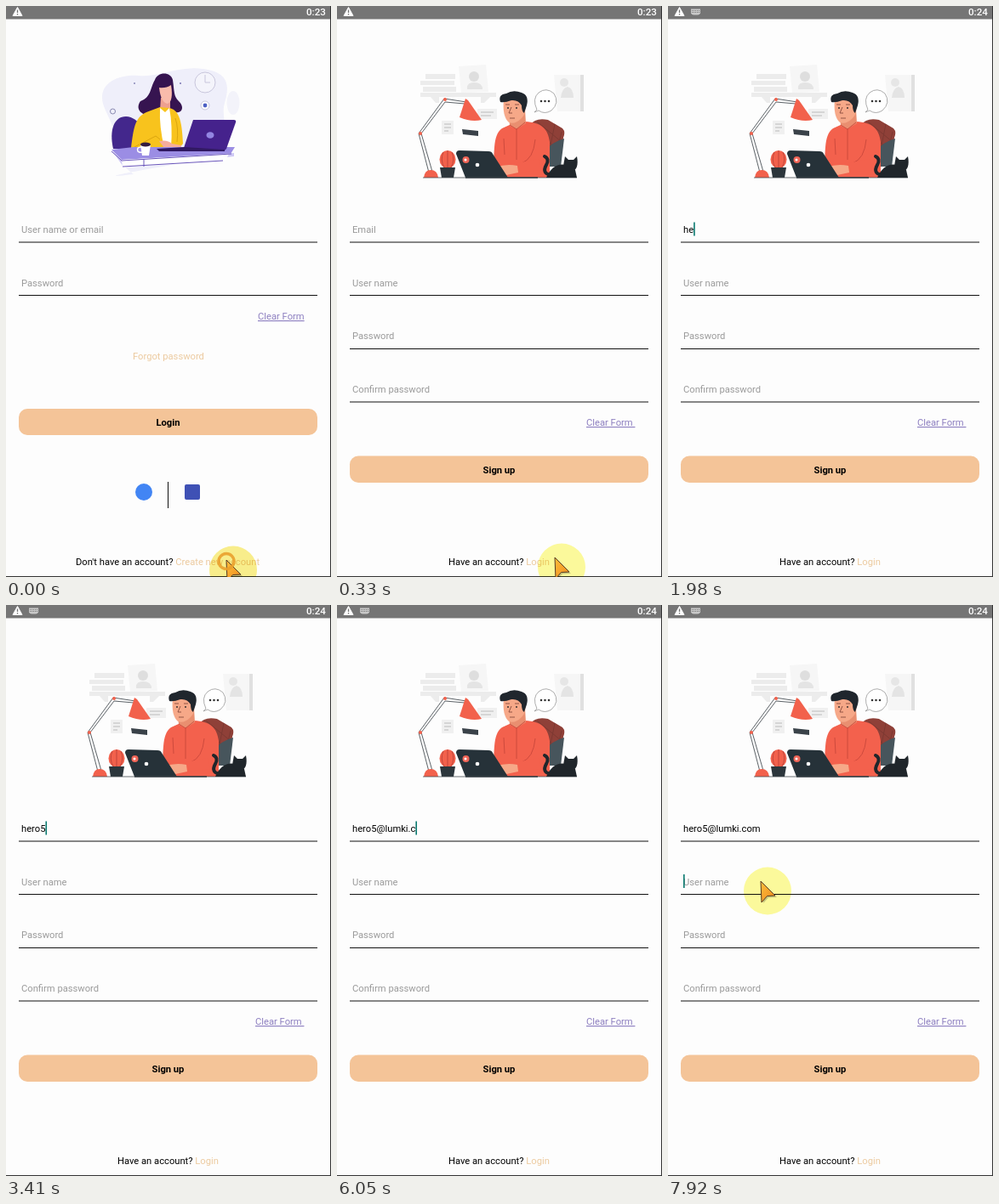
Recreate the animation shown at these times as an HTML page. Size 382 by 672 pixels, loop 8000 ms.

```html
<!DOCTYPE html>
<html lang="en">
<head>
<meta charset="utf-8">
<title>Sign up form</title>
<style>
  html, body { margin: 0; width: 100%; height: 100%; overflow: hidden; background: #fdfdfd; }
  svg { display: block; width: 382px; height: 672px; }
  text { font: 11.2px Roboto, sans-serif; white-space: pre; }
  .hint { fill: #9a9a9a; }
  .link { fill: #8d7fc0; text-decoration: underline; }
  .soft { fill: #ecca9f; }
  .bold { font-weight: 700; text-anchor: middle; }
  .rule { stroke: #111; stroke-width: 1.2; }
  .button { fill: #f4c498; }
  #halo { fill: #fdfb9c; mix-blend-mode: multiply; }
</style>
</head>
<body>
<svg viewBox="0 0 382 672">
  <defs>
    <linearGradient id="gold" x2="1" y2="1">
      <stop stop-color="#ffbd3c"/><stop offset="1" stop-color="#ee8a1c"/>
    </linearGradient>
  </defs>
  <rect width="382" height="672" fill="#fdfdfd"/>

  <g id="login">
    <!-- woman at a desk -->
    <path d="M114 115C108 92 130 80 156 82S202 70 232 74S263 94 257 114S269 157 245 178T172 191 150 198S126 182 127 160S119 131 114 115Z" fill="#efeffa"/>
    <ellipse cx="267" cy="114" rx="7.5" ry="14" fill="#f3f3fa"/>
    <g fill="none" stroke="#c3c1d8" stroke-width=".9">
      <circle cx="234" cy="90" r="12" fill="#f4f4fb"/><path d="M234 81V90H240"/>
      <circle cx="234" cy="117" r="5" fill="#fff"/>
      <circle cx="125.500" cy="124" r="3" stroke="#7c7ca8"/>
    </g>
    <circle cx="234" cy="117" r="2.400" fill="#4d60c4"/>
    <circle cx="151" cy="91" r="1" fill="#8a8ab8"/><circle cx="205" cy="91" r="1" fill="#7773b0"/>
    <path d="M126 168C121 146 127 130 141 130C157 131 164 148 170 168Z" fill="#43278c"/>
    <path d="M175 87C178 77 194 77 196 87C198 101 197 106 203 112C211 120 206 127 198 125L176 128C160 131 151 122 158 112C171 107 169 97 175 87Z" fill="#361450"/>
    <path d="M182 108H193V122L188 128L181 122Z" fill="#eda090"/>
    <path d="M180 96Q188 97 194 93Q197 112 190 115Q182 114 180 96Z" fill="#f9bbab"/>
    <path d="M147 167C150 145 151 131 165 125L181 119L192 120C202 122 207 132 208 162L204 167Z" fill="#f8c31d"/>
    <path d="M181 120L187 125L192 120Q196 141 194 166H186Q180 143 181 120Z" fill="#fff"/>
    <path d="M151 166L176 153L181 157M199 132Q203 144 201 160" fill="none" stroke="#dba50e"/>
    <path d="M180 159Q190 157 195 162L206 164V167H186Z" fill="#f6ad9c"/>
    <path d="M124 169L150 166H269L264 174L136 181Z" fill="#9b8de4"/>
    <path d="M124 169L136 181L268 173V177L137 188Z" fill="#cfc9f5"/>
    <path d="M136 181L262 174L258 182L137 190Z" fill="#fff"/>
    <path d="M124 171L136 182L265 174M137 189L255 182M162 180V189" fill="none" stroke="#6a56bb"/>
    <path d="M220 134H268Q271 134 270 137L259 168L257 170H208Z" fill="#45228c"/>
    <path d="M177 168L210 166L257 169V171H180Z" fill="#301861"/>
    <ellipse cx="240" cy="152" rx="4.500" ry="3.800" fill="#9386e2"/>
    <path d="M158 163H170L168 176H160Z" fill="#fff"/>
    <path d="M159 166Q153 166 155 171Q157 173 160 172" fill="none" stroke="#fff" stroke-width="1.500"/>
    <ellipse cx="164" cy="163" rx="6" ry="2.500" fill="#341c3f"/>

    <text class="link" x="296" y="369">Clear Form</text>
    <text class="soft" x="149" y="416">Forgot password</text>
    <rect class="button" x="15" y="474" width="351" height="31" rx="10"/>
    <text class="bold" x="190.500" y="494">Login</text>
    <circle cx="162" cy="572" r="10" fill="#4285f4"/>
    <path d="M190.500 560V591" stroke="#111"/>
    <rect x="210" y="563" width="18" height="18" rx="2" fill="#3f51b5"/>
    <text x="82" y="658">Don't have an account? <tspan class="soft">Create new account</tspan></text>
  </g>

  <g id="signup">
    <!-- man at a laptop -->
    <g fill="#ececec">
      <path d="M98 102H187V107H98ZM104 80H139V86H104ZM98 88H138V93H98ZM101 95H140V101H101Z"/>
      <path d="M110 107L116 114H120V107ZM169 107V114H173L180 107Z"/>
      <path d="M286 81H290V124H286Z" fill="#e0e0e0"/>
    </g>
    <path d="M143 71L175 69L178 101L146 102ZM255 81H286V124H259Z" fill="#f6f6f6"/>
    <path d="M153 98Q152 90 161 90Q171 90 171 98ZM263 108Q264 97 271 95Q278 97 278 108Z" fill="#e4e4e4"/>
    <circle cx="161" cy="83" r="6" fill="#dedede"/><circle cx="267" cy="90" r="5" fill="#e6e6e6"/>
    <path d="M123 135H137V151H123ZM165 121H188V133H165Z" fill="#f0f0f0"/>
    <path d="M126 139H134M126 143H134M126 147H131M169 125H184M169 129H181" stroke="#bbb"/>
    <path d="M147 145L166 147V153L148 151Z" fill="#3a4249"/>
    <path d="M108 196L96 150L126 109L152 113M112 195L99 150L127 113L150 115" fill="none" stroke="#4a5156" stroke-width=".9"/>
    <path d="M151 109L154 111L170 134Q158 137 144 131Z" fill="#f2614c"/>
    <g fill="#f2614c">
      <circle cx="98" cy="150" r="2"/><circle cx="127" cy="110" r="2"/>
      <path d="M102 202Q103 193 110 193Q118 193 119 202Z"/>
      <ellipse cx="130" cy="180.500" rx="9.500" ry="10.500"/>
    </g>
    <path d="M130 170V190M125 172Q121 181 126 190M135 172Q139 181 134 190" fill="none" stroke="#c2453a"/>
    <path d="M121 190H139L137 202H123Z" fill="#2c363c"/>

    <path d="M227 140Q233 131 248 134L265 144Q269 148 266 155L263 182L245 190Z" fill="#8f4038"/>
    <path d="M235 136L264 160M229 141L262 172M256 139L249 174M264 148L256 181" stroke="#7c3831" fill="none"/>
    <path d="M246 170Q252 160 267 156L263 189H247Z" fill="#47555c"/>
    <path d="M183 194C186 176 182 152 194 144L205 139L221 136C240 137 248 144 250 160V202H185Z" fill="#f3614d"/>
    <path d="M202 128L221 122L222 138L211 145L203 141Z" fill="#e98f70"/>
    <path d="M196 110Q208 106 221 114Q223 126 217 132Q209 140 202 137Q194 130 196 110Z" fill="#f6a888"/>
    <path d="M192 113Q189 104 199 103Q207 98 217 102Q226 105 223 117L220 126Q217 124 217 117Q213 110 205 111Q197 114 192 113Z" fill="#20262d"/>
    <path d="M198 116H203M209 116H214M205 119L202 126H206M203 132H209" fill="none" stroke="#8a4a3d" stroke-width=".9"/>
    <circle cx="201" cy="120" r="1" fill="#39302f"/><circle cx="211" cy="120" r="1" fill="#39302f"/>
    <path d="M203 140L211 145L221 137M211 145V181M233 157Q231 180 217 185M196 156L197 175" fill="none" stroke="#c9483b" stroke-width=".9"/>
    <path d="M211 185L237 180L240 193L213 196Z" fill="#f3614d"/>
    <path d="M186 190Q199 185 212 188L213 196L199 199L187 195Z" fill="#f6a888"/>
    <path d="M140 174Q140 170 144 170L178 171Q182 171 183 174L201 202H151Z" fill="#263239"/>
    <circle cx="151.500" cy="181" r="4" fill="#ef6557"/><circle cx="151" cy="181" r="1.500" fill="#fff"/>
    <circle cx="165" cy="187" r="2.300" fill="#fff"/>
    <path d="M151 202H236" stroke="#263239" stroke-width="1.500"/>
    <path d="M101 202H282" stroke="#454d52" stroke-width=".8"/>
    <g fill="#20262b">
      <path d="M246 202Q254 184 269 187L280 193L282 202Z"/>
      <path d="M266 188L268 177L272 181H278L282 177Q285 193 275 195Q268 194 266 188Z"/>
      <path d="M253 199Q240 198 246 187Q250 180 244 177" fill="none" stroke="#20262b" stroke-width="4" stroke-linecap="round"/>
    </g>
    <path d="M235 122Q229 109 237 102Q246 95 255 103Q262 114 252 123Q244 128 237 123L232 125Z" fill="#fff" stroke="#999" stroke-width=".8"/>
    <g fill="#333"><circle cx="240" cy="112" r="1.300"/><circle cx="244.500" cy="112" r="1.300"/><circle cx="249" cy="112" r="1.300"/></g>

    <text class="hint" x="18" y="392">Password</text>
    <text class="hint" x="18" y="455">Confirm password</text>
    <path class="rule" d="M15 403.500H366M15 466H366"/>
    <text class="link" x="293" y="494">Clear Form </text>
    <rect class="button" x="15" y="529.500" width="351" height="31.500" rx="10"/>
    <text class="bold" x="190.500" y="550">Sign up</text>
    <text x="131" y="658">Have an account? <tspan class="soft">Login</tspan></text>
  </g>

  <text id="first" x="18" y="267"></text>
  <text id="second" class="hint" x="18" y="330"></text>
  <path class="rule" d="M15 278H366M15 340.500H366"/>
  <rect id="caret" width="1.600" height="16" fill="#0b7a70"/>

  <rect width="382" height="15.500" fill="#757575"/>
  <path d="M13.500 1.500L19 11.500H8Z" fill="#fff" stroke="#fff" stroke-linejoin="round"/>
  <path d="M13.500 4.500V8M13.500 9V10.500" stroke="#757575" stroke-width="1.300"/>
  <g id="keyboard" fill="none">
    <path d="M27 3.500H38V8.500Q37 10.500 35 10.500H30Q28 10.500 27 8.500Z" fill="#c9c9c9"/>
    <path d="M28 5.500H37M28 7.500H37" stroke="#757575" stroke-dasharray="1 1"/>
  </g>
  <text id="clock" x="353" y="11" fill="#fff" style="font-size:11.6px;font-weight:500"></text>
  <path d="M381.500 0V672M0 671.500H382" stroke="#333"/>

  <circle id="halo" r="28"/>
  <g id="pointer">
    <path d="M2 2L19 19L9 19.500L3 26Z" fill="#0003"/>
    <path d="M0 0L17 17L7.500 17.500L1 25Z" fill="url(#gold)" stroke="#573c25" stroke-linejoin="round"/>
    <circle id="ring" cx="0" cy="1.500" r="9" fill="none" stroke="#e9a02c" stroke-width="3.500" opacity=".9"/>
  </g>
</svg>
<script>
const LOOP = 8000, STEP = 110;
const EMAIL = 'hero5@lumki.com';
const keyTimes = [1760, 1870, 2200, 2860, 3410, 4400, 5060, 5390, 5500, 5610, 5720, 5940, 6050, 6160, 6270];
// Spans during which the text caret is hidden.
const blinks = [[0, 1210], [1540, 1760], [2640, 2860], [3190, 3410], [3850, 4070], [4840, 5060],
  [6600, 6930], [7260, 7480], [7700, 7920]];
// Pointer tip: time, x, y.
const path = [[0, 259, 652], [330, 256, 649], [770, 57, 270], [6600, -8, 228], [7370, 109, 325]];

const $ = id => document.getElementById(id);
const within = (t, a, b) => t >= a && t < b;
const show = (id, on) => $(id).style.display = on ? '' : 'none';
const ease = k => k * k * (3 - 2 * k);

function tipAt(t) {
  const next = path.findIndex(p => p[0] > t);
  if (next < 0) return path[path.length - 1].slice(1);
  const [t0, x0, y0] = path[next - 1], [t1, x1, y1] = path[next];
  // The pointer rests in place until it is hidden.
  const k = t0 === 770 ? 0 : ease((t - t0) / (t1 - t0));
  return [x0 + (x1 - x0) * k, y0 + (y1 - y0) * k];
}

function draw(t) {
  const joining = t >= 220;
  show('login', !joining);
  show('signup', joining);

  const typed = EMAIL.slice(0, keyTimes.filter(k => k <= t).length);
  const first = $('first');
  first.textContent = typed || (joining ? 'Email' : 'User name or email');
  first.setAttribute('class', typed ? '' : 'hint');
  $('second').textContent = joining ? 'User name' : 'Password';

  const inSecond = t >= 7480;
  const width = typed && !inSecond ? first.getComputedTextLength() : 0;
  $('caret').setAttribute('x', 18 + width);
  $('caret').setAttribute('y', inSecond ? 317 : 254.5);
  show('caret', !blinks.some(([a, b]) => within(t, a, b)));

  $('clock').textContent = t < 1210 ? '0:23' : '0:24';
  show('keyboard', t >= 1650);

  const [x, y] = tipAt(t);
  const visible = !within(t, 1760, 6600);
  show('pointer', visible);
  show('halo', visible);
  show('ring', t < 220 || within(t, 990, 1210) || within(t, 7480, 7700));
  $('pointer').setAttribute('transform', `translate(${x} ${y})`);
  $('halo').setAttribute('transform', `translate(${x + 8} ${y + 11.5})`);
  $('halo').style.fill = t < 220 ? '#faef8c' : '';
}

const start = performance.now();
function tick() {
  const t = (performance.now() - start) % LOOP;
  draw(Math.floor(t / STEP) * STEP);
  requestAnimationFrame(tick);
}
tick();
</script>
</body>
</html>
```
